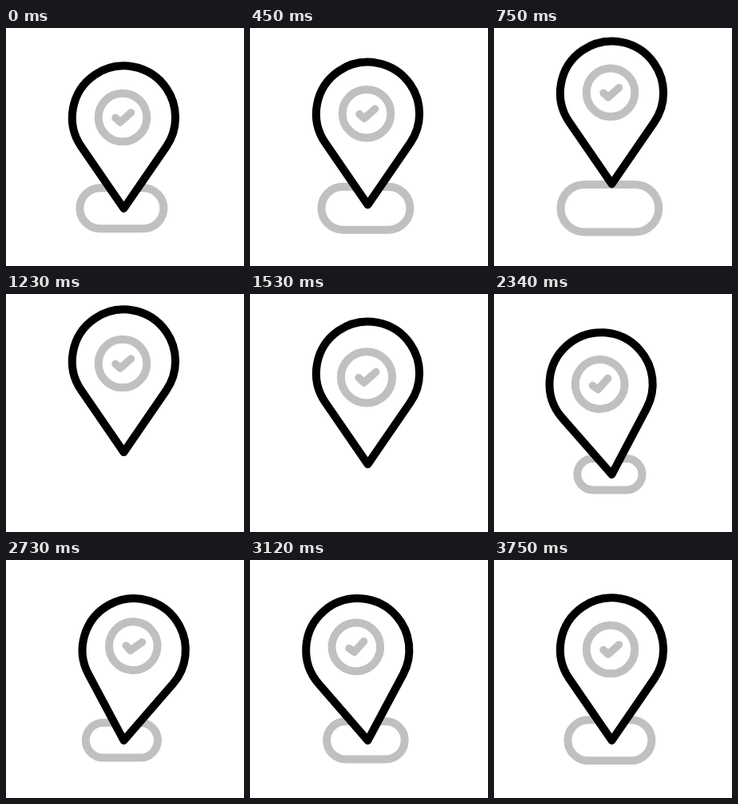
Recreate the animation shown at these times as an HTML page with a canvas. Size 298 by 298 pixels, loop 4500 ms.

```html
<!DOCTYPE html>
<html>
<head>
<meta charset="utf-8">
<title>Location pin</title>
<style>
  html, body { margin: 0; width: 100%; height: 100%; overflow: hidden; background: #fff; }
  canvas { display: block; }
</style>
</head>
<body>
<canvas id="stage" width="298" height="298"></canvas>
<script>
const ctx = document.getElementById('stage').getContext('2d');
const LOOP = 4500, STEP = 30;
const GRAY = '#c0c0c0';
const LAND = 1650;
const TIP = { x: 147.5, y: 226 };
const HEAD = { dist: 114, r: 64.6 };

const clamp = v => Math.min(1, Math.max(0, v));
const progress = (t, from, to) => clamp((t - from) / (to - from));
const easeInOut = p => (1 - Math.cos(Math.PI * p)) / 2;
const easeOut = p => 1 - (1 - p) ** 2;

// Eased interpolation between [time, value] keys.
function track(t, keys) {
  if (t <= keys[0][0]) return keys[0][1];
  for (let i = 1; i < keys.length; i++) {
    const [t0, v0] = keys[i - 1], [t1, v1] = keys[i];
    if (t < t1) return v0 + (v1 - v0) * easeInOut((t - t0) / (t1 - t0));
  }
  return keys[keys.length - 1][1];
}

const TILT = [[1560, 0], [1890, 7.9], [2310, -7], [2670, 7.4], [3030, -7], [3510, 0]];
const BADGE_LAG = [[330, 0], [750, -0.5], [1230, 3], [1500, 5], [1890, 11.7],
                   [2340, 0], [2760, -5], [3120, -4], [3750, 0]];
const BADGE_SCALE = [[1350, 1], [1875, 1.23], [2340, 1.02], [2600, 1]];

// Right-hand sparks as inner x, inner y, outer x, outer y.
const SPARKS = [[213, 188.5, 232, 175.5], [206, 201.3, 238, 205.4], [209.7, 218.6, 226.7, 233.6]];

function stroke(color, width) {
  ctx.strokeStyle = color;
  ctx.lineWidth = width;
  ctx.stroke();
}

function baseScale(t) {
  if (t < 1230) return 1 + 0.35 * progress(t, 300, 1230);
  if (t < LAND) return 0;
  return 1 - 0.34 * (Math.max(0, 3750 - t) / 1860) ** 1.46;
}

function drawBase(t) {
  const s = baseScale(t);
  if (!s) return;
  const w = 105 * s, h = 51 * s;
  ctx.beginPath();
  ctx.roundRect(144.9 - w / 2, 225.7 - h / 2, w, h, h / 2);
  stroke(GRAY, 10);
}

function drawSparks(t) {
  const head = easeOut(progress(t, 1620, 2010));
  const tail = progress(t, 1710, 2130);
  if (head <= 0 || tail >= 1 || head <= tail) return;
  ctx.beginPath();
  for (const [x0, y0, x1, y1] of SPARKS) {
    const at = p => [x0 + (x1 - x0) * p, y0 + (y1 - y0) * p];
    const [ax, ay] = at(tail), [bx, by] = at(head);
    ctx.moveTo(ax, ay);
    ctx.lineTo(bx, by);
    ctx.moveTo(296 - ax, ay);
    ctx.lineTo(296 - bx, by);
  }
  stroke(GRAY, 9.5);
}

function lift(t) {
  if (t < 900) return 32 * easeInOut(progress(t, 330, 810));
  return 32 * (1 - progress(t, 900, 1680) ** 2.4);
}

function drawBadge(t) {
  const s = track(t, BADGE_SCALE);
  const checkScale = 1 + (s - 1) * 1.8;
  ctx.translate(-1.5, -HEAD.dist + track(t, BADGE_LAG));
  ctx.beginPath();
  ctx.arc(0, 0, 30.3 * s, 0, 2 * Math.PI);
  stroke(GRAY, 10);
  ctx.beginPath();
  for (const [x, y] of [[-9, 0.5], [-3, 6], [10.5, -6]]) ctx.lineTo(x * checkScale, y * checkScale);
  stroke(GRAY, 9.5);
}

function drawPin(t) {
  const edge = Math.asin(HEAD.r / HEAD.dist);
  ctx.save();
  ctx.translate(TIP.x, TIP.y - lift(t));
  ctx.rotate(track(t, TILT) * Math.PI / 180);
  ctx.beginPath();
  ctx.moveTo(0, 0);
  ctx.arc(0, -HEAD.dist, HEAD.r, Math.PI - edge, edge);
  ctx.closePath();
  ctx.fillStyle = '#fff';
  ctx.fill();
  stroke('#000', 10);
  drawBadge(t);
  ctx.restore();
}

function draw(t) {
  ctx.fillStyle = '#fff';
  ctx.fillRect(0, 0, 298, 298);
  ctx.lineCap = ctx.lineJoin = 'round';
  drawBase(t);
  drawSparks(t);
  drawPin(t);
}

const start = performance.now();
function frame() {
  const t = (performance.now() - start) % LOOP;
  draw(Math.floor(t / STEP) * STEP);
  requestAnimationFrame(frame);
}
frame();
</script>
</body>
</html>
```
